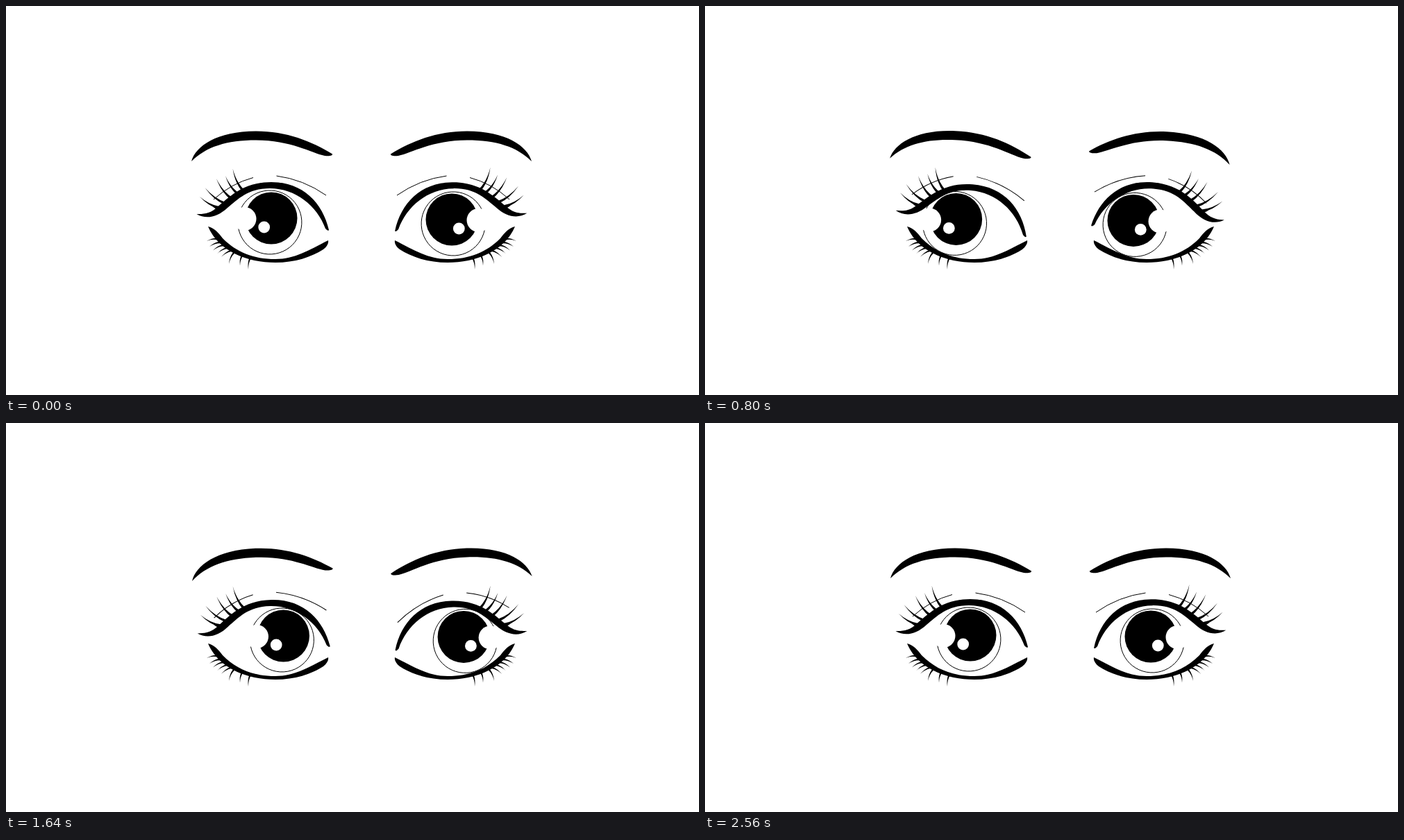
An HTML page that plays this animation: 998x561 px, repeating every 2960 ms.

```html
<!DOCTYPE html>
<html lang="en">
<head>
<meta charset="utf-8">
<title>Glancing eyes</title>
<style>
  html, body { margin: 0; width: 100%; height: 100%; overflow: hidden; background: #fff; }
  svg { display: block; width: 100%; height: 100%; }
  .line { fill: none; stroke: #000; stroke-width: 1; }
  .white { fill: #fff; }
</style>
</head>
<body>
<svg id="stage" viewBox="0 0 998 561"></svg>
<script>
const AXIS = 1024; // the right eye is the left one mirrored: x -> AXIS - x
const TICK = 40, LOOP = 2960;

// Tapered hair from a pointed tip to a base of the given width.
function lash([tx, ty, bx, by], width, bend) {
  const dx = bx - tx, dy = by - ty, len = Math.hypot(dx, dy);
  const nx = -dy / len, ny = dx / len, h = width / 2;
  const cx = tx + dx * 0.55 - dy * bend, cy = ty + dy * 0.55 + dx * bend;
  const at = (x, y, k) => `${(x + nx * k).toFixed(2)} ${(y + ny * k).toFixed(2)}`;
  return `M${tx} ${ty}Q${at(cx, cy, h * 0.5)} ${at(bx, by, h)}` +
    `L${at(bx, by, -h)}Q${at(cx, cy, -h * 0.5)} ${tx} ${ty}Z`;
}

const upperLashes = [
  [279, 275, 307, 291], [286.5, 262, 316, 285], [303, 249, 325, 278],
  [316, 245, 334, 271], [326.5, 234.5, 342, 267], [295, 286.5, 306, 292]
].map(l => lash(l, 4, 0.14)).join("");

const lowerLashes = [
  [289, 339, 304, 336], [293, 347, 308, 341], [298, 352.5, 313, 345],
  [304, 357.5, 318, 349], [310, 362, 324, 353], [321, 372, 328, 356],
  [337, 374.5, 340, 360], [349, 380, 352, 363]
].map(l => lash(l, 2.6, -0.15)).join("");

const path = (d, cls = "") => `<path class="${cls}" d="${d}"/>`;
const disc = (x, y, r, cls = "") => `<circle class="${cls}" cx="${x}" cy="${y}" r="${r}"/>`;

const shapes = {
  lower:
    path("M291 318C300 320 306 327 312 335C332 355 356 365 388 365C416 365 436 352 464 338" +
         "C465 343 461 348 457 351C440 362 416 370 388 370C348 370 306 354 291 318Z") +
    path(lowerLashes),
  brow:
    path("M267 224C273 202 304 180.5 360 180.5C404 180.5 440 195 470 213.5C471 215.5 466 217 459 216" +
         "C440 212 410 193.5 360 193.5C318 193.5 288 203 267 224Z"),
  crease: path("M299 279Q324 256 356 247.5M389.5 245Q428 250 461 273", "line"),
  lash: path(upperLashes),
  lid:
    path("M274.5 300C284 300 292 300 302 292C320 277 340 254 382 254C428 254 456 284 465 323" +
         "C464 325 462 323 460 321C448 288 417 263 380 263C348 263 334 279 319 291" +
         "C304 305 288 308 274.5 300Z"),
  iris:
    path("M338 293A46 46 0 1 1 334 315", "line") +
    disc(382, 306, 37.5) + disc(343.5, 307, 17, "white") + disc(371.7, 319, 8.4, "white")
};

const pivots = {
  lower: [0, 0], brow: [368.5, 219], crease: [380, 276],
  lash: [370, 312], lid: [370, 312], iris: [380, 312]
};

// Each pose: dx, dy, degrees.
const still = [0, 0, 0];
const moving = [
  { shape: "brow", side: 1, rest: still, left: [-1, 0, 3.4], centre: still, right: [1.5, 0, -4.5] },
  { shape: "brow", side: -1, rest: still, left: [-1.5, 0.5, 3.7], centre: still, right: [1, 0.5, -3.6] },
  { shape: "crease", side: 1, rest: still, left: [-1.5, 0.5, 7.4], centre: still, right: [1, -1, -3.6] },
  { shape: "crease", side: -1, rest: still, left: [-3, 0, 8], centre: [-1, 1, -7.1], right: [1.5, 1, -12.1] },
  { shape: "lash", side: 1, rest: still, left: [-1.5, 1.5, 6.2], centre: still, right: [3.5, -0.5, -2.5] },
  { shape: "lash", side: -1, rest: [1, -1.2, -0.7], left: [-3, -1.5, 5.7], centre: [-0.5, 1, 1.5], right: [4, 0.5, -3.8] },
  { shape: "lid", side: 1, rest: still, left: [-1.5, 3, 6.2], centre: still, right: [3, 2.5, -2.7] },
  { shape: "lid", side: -1, rest: [1, 0, -0.7], left: [-3, 0.5, 5.7], centre: [-0.5, 2.5, 1.5], right: [3, 2, -4.35] },
  { shape: "iris", side: 1, rest: still, left: [-28.5, 2, 0], centre: still, right: [35, 2, 0] },
  { shape: "iris", side: -1, rest: [0, 2, 0], left: [-35, 4, 0], centre: [0, 2, 0], right: [34.2, 2.8, 0] }
];

const glances = [
  { start: 0, steps: 7, from: "rest", to: "left" },
  { start: 720, steps: 7, from: "left", to: "centre" },
  { start: 1480, steps: 8, from: "centre", to: "right" },
  { start: 2240, steps: 8, from: "right", to: "rest" }
];

const stage = document.getElementById("stage");

function addPart(shape, side) {
  const g = document.createElementNS("http://www.w3.org/2000/svg", "g");
  g.innerHTML = shapes[shape];
  stage.append(g);
  place(g, shape, side, still);
  return g;
}

function place(g, shape, side, [dx, dy, turn]) {
  const [px, py] = pivots[shape];
  const x = side > 0 ? px : AXIS - px;
  g.setAttribute("transform",
    `translate(${x + dx} ${py + dy}) rotate(${turn}) scale(${side} 1) translate(${-px} ${-py})`);
}

addPart("lower", 1);
addPart("lower", -1);
for (const part of moving) part.node = addPart(part.shape, part.side);

function draw(time) {
  const t = time % LOOP;
  const { start, steps, from, to } = glances.findLast(g => g.start <= t);
  const k = Math.min(1, Math.floor((t - start) / TICK) / steps);
  for (const part of moving) {
    const pose = part[from].map((v, i) => v + (part[to][i] - v) * k);
    place(part.node, part.shape, part.side, pose);
  }
}

const begin = performance.now();
function frame() {
  draw(Math.max(0, performance.now() - begin));
  requestAnimationFrame(frame);
}
frame();
</script>
</body>
</html>
```
